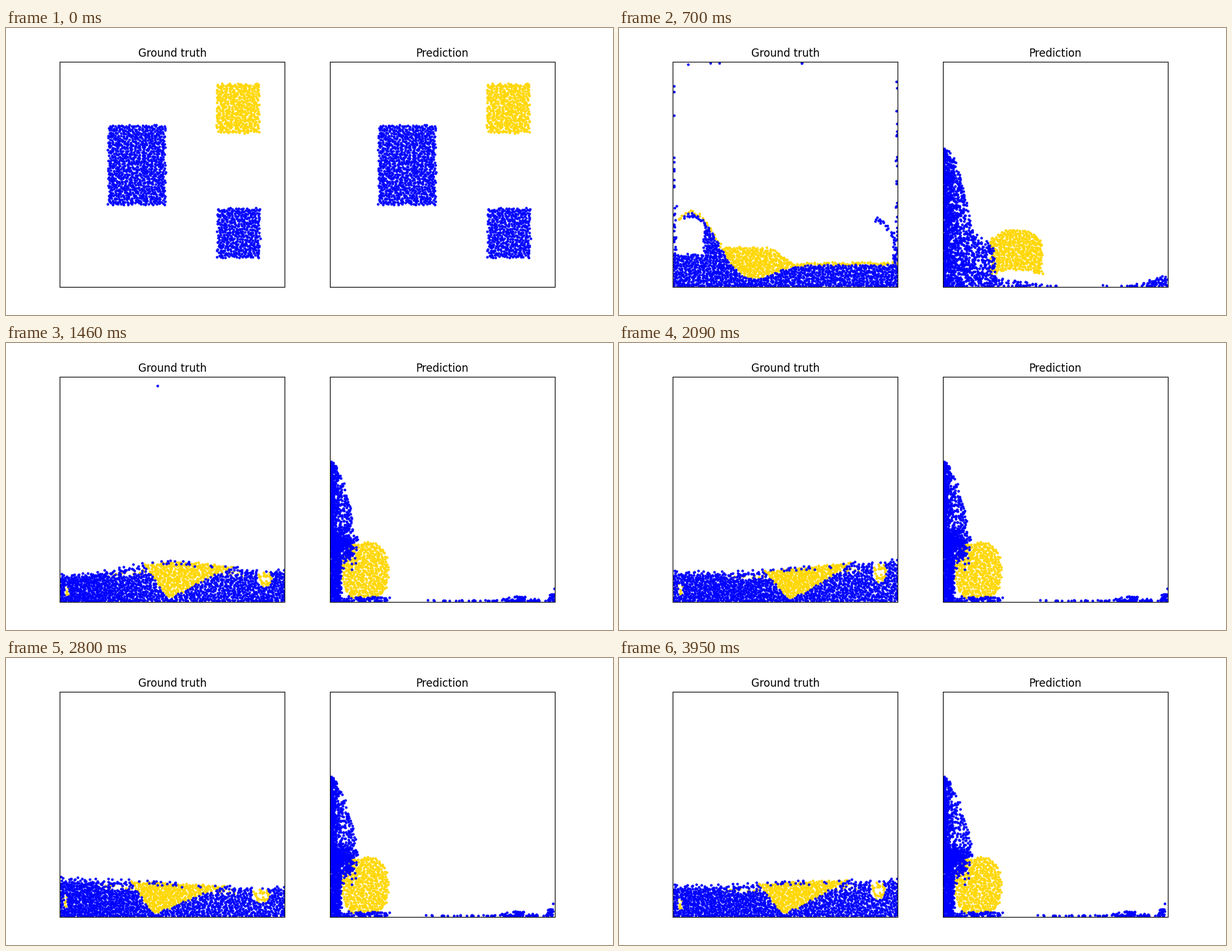
These frames come from a looping animation (950 by 450 pixels, 3.99 s). A matplotlib script:

```python
import numpy as np
import matplotlib.pyplot as plt
from matplotlib.animation import FuncAnimation

W, H, DPI = 950, 450, 100
FRAMES, INTERVAL = 114, 35
TANK_W, TANK_H, FLOOR = 352, 353, 406.1
N_WATER, N_SAND = 1400, 430
GRAVITY = 1693.0
KEYS = np.array([0.2, 0.42, 0.7, 1.1])

# Evenly spread candidate points; x runs from the left wall, h from the floor
rng = np.random.default_rng(7)
M = 80000
SPREAD = np.arange(1, M + 1)[:, None] * (0.7548776662, 0.5698402910) % 1
SPREAD = SPREAD * (TANK_W, TANK_H)
CHANCE = rng.random(M)


def ranked(pts, size=40):
    """Order by columns, then by height, so that poses pair up smoothly."""
    pts = pts[np.argsort(pts[:, 0])]
    cols = np.split(pts, range(size, len(pts), size))
    return np.concatenate([c[np.argsort(c[:, 1])] for c in cols])


def pose(n, density):
    """n points that follow a density between 0 and 1."""
    pts = SPREAD[CHANCE < density(*SPREAD.T)][:n]
    return ranked(pts + rng.uniform(-1, 1, pts.shape))


def layers(*parts):
    """Joins (weight, mask) pairs; the heaviest one counts."""
    return np.max([weight * mask for weight, mask in parts], axis=0)


def bell(x, centre, width):
    return np.exp(-((x - centre) / width) ** 2)


def block(x, h, x0, x1, h0, h1):
    return (x > x0) & (x < x1) & (h > h0) & (h < h1)


# Starting blocks
def water_blocks(x, h):
    return block(x, h, 75, 165, 129, 254) | block(x, h, 246.5, 313, 46, 124)


def sand_block(x, h):
    return block(x, h, 245, 312, 242, 319)


# Ground truth: jets up the walls, a breaking wave, then a calm pool
def jets(x, h):
    return h < 20 + 270 * np.exp(-x / 45) + 120 * np.exp((x - TANK_W) / 12)


def wave_top(x):
    return 35 - 25 * bell(x, 118, 50) + 82 * bell(x, 30, 52)


def wave_water(x, h):
    top = wave_top(x)
    cavity = (x < 48) & (h > 51) & (h < top - 6 * (x > 17))
    curl = (x > 313) & (abs(h - 107 + 0.027 * (x - 313) ** 2) < 3.5)
    return layers((1, (h < top) & ~cavity & ((x > 17) | (h < 51))),
                  (0.5, (x < 5) & (h < 136)),
                  (0.7, curl | (x > 344) & (h < 85)),
                  (0.25, ((x < 2) | (x > 349)) & (h < 330)),
                  (0.09, h > 350))


def wave_sand(x, h):
    top = wave_top(x)
    heap = 63 * np.exp(-((x - 110) / 90) ** 4)
    return (x > 8) & (h > top) & (h < np.maximum(top + 4, heap))


def sand_zones(x, h):
    bed = 3 + np.maximum(1.25 * (178 - x), 0.5 * (x - 178))
    streak = (abs(h - 43) < 4) & (abs(x - 185) < 108)
    pocket = ((x - 322) / 11) ** 2 + ((h - 38) / 13) ** 2 < 1
    corner = ((x - 11) / 4) ** 2 + ((h - 22) / 12) ** 2 < 1
    return (h > bed) & (h < 53), streak, pocket | corner


def pool_sand(x, h):
    wedge, streak, spots = sand_zones(x, h)
    return layers((1, wedge), (0.35, streak), (0.6, spots))


def pool_water(x, h):
    wedge, streak, spots = sand_zones(x, h)
    return layers((1, (h < 49) & ~(wedge | streak | spots)),
                  (0.4, streak & ~wedge),
                  (0.3, (h > 49) & (h < 55)))


# Prediction: a slump to the left, then a pile stuck on the wall
def slump(x, h):
    return layers((1, h < 240 * (1 - x / 105)),
                  (0.6, (x > 105) & (h < 10 + 28 * bell(x, 235, 80))))


def pile_water(x, h):
    edge = 4 * np.sqrt(np.maximum(218 - h, 0)) + 27 / (1 + np.exp((h - 78) / 4))
    return layers((0.3 + 0.7 * np.exp(-x / 12), x < edge),
                  (0.3, h < (185 - x) / 7),
                  (0.45, h < (x - 285) / 3.4),
                  (0.03, h < 4))


def slide_sand(x, h):
    arch = 1 - ((x - 114) / 41) ** 2
    return (arch > 0) & (h > 18 + 10 * arch) & (h < 75 + 16 * arch)


def stuck_water(x, h):
    edge = 3.6 * np.sqrt(np.maximum(220 - h, 0))
    hump = bell(x, 295, 25)
    return layers((0.2 + 0.8 * bell(x, 0, 7), (x < edge) & (h > 100)),
                  (bell(x, 10, 22) * bell(h, 92, 20), x < 43),
                  (0.6, (x < 17) & (h < 90)),
                  (0.25, (x < 92) & (h < 8)),
                  (0.12 + 0.2 * hump, (x > 150) & (h < 3 + 7 * hump)),
                  (0.5, h < 1.4 * (x - 336)))


def stuck_sand(x, h):
    return (abs((x - 55) / 37) ** 2.5 + abs((h - 48) / 46) ** 2.5 < 1) & (h > 6)


def fall(start, speed, t):
    return start + speed * t - (0, GRAVITY * t * t / 2)


class Flow:
    """Free fall up to the first key, then a smooth path through the poses."""

    def __init__(self, start, speed, *poses):
        self.start, self.speed = start, speed
        self.poses = np.array([fall(start, speed, KEYS[0]), *poses])
        self.slopes = np.gradient(self.poses, KEYS, axis=0)
        self.slopes[0] = speed - np.array([0, GRAVITY * KEYS[0]])
        self.slopes[-1] = 0

    def at(self, t):
        if t < KEYS[0]:
            return fall(self.start, self.speed, t)
        if t >= KEYS[-1]:
            return self.poses[-1]
        k = np.searchsorted(KEYS, t, "right") - 1
        d = KEYS[k + 1] - KEYS[k]
        u = (t - KEYS[k]) / d
        return ((2 * u**3 - 3 * u**2 + 1) * self.poses[k]
                + (u**3 - 2 * u**2 + u) * d * self.slopes[k]
                + (3 * u**2 - 2 * u**3) * self.poses[k + 1]
                + (u**3 - u**2) * d * self.slopes[k + 1])


def slosh(rest, t):
    """Standing waves of the settled pool."""
    x, h = rest.T
    s = np.pi * np.clip(x / TANK_W, 0, 1)
    swing = np.cos(2 * np.pi * (t - 1.9) / 2.44)
    hump = 8 * np.exp((1.46 - t) / 0.5) * np.cos(2 * np.pi * (t - 1.46) / 1.33)
    level = 54.3 - 10 * swing * np.cos(s) - hump * np.cos(2 * s)
    return np.column_stack([x + (21 * swing - 15.6) * np.sin(s), h * level / 53])


def creep(pts, t):
    """Slow drift of the loose drops beside the stuck pile."""
    x, h = pts.T
    k = np.clip((t - 1.46) / 2.5, 0, 1)
    f = np.clip(x / 40, 0, 1) * (h > 106)
    return np.column_stack([x + 14 * k * f**2 - 5 * k * (x > 140),
                            h - 22 * k * f**2])


def lone_drop(t):
    """Hangs from the ceiling, then falls into the pool."""
    return 152.5, max(351 - GRAVITY / 2 * max(t - 1.314, 0) ** 2, 50)


water0, sand0 = pose(N_WATER, water_blocks), pose(N_SAND, sand_block)
water_v = np.where(water0[:, :1] < 200, (-300.0, 0.0), (0.0, 0.0))
sand_v = np.array([-235.0, 0.0])
sand_air = fall(sand0, sand_v, KEYS[1])
calm_water, calm_sand = pose(N_WATER, pool_water), pose(N_SAND, pool_sand)

true_water = Flow(water0, water_v, pose(N_WATER, jets),
                  pose(N_WATER, wave_water), slosh(calm_water, KEYS[-1]))
true_sand = Flow(sand0, sand_v, sand_air,
                 pose(N_SAND, wave_sand), slosh(calm_sand, KEYS[-1]))
pred_water = Flow(water0, water_v, pose(N_WATER, slump),
                  pose(N_WATER, pile_water), pose(N_WATER, stuck_water))
pred_sand = Flow(sand0, sand_v, sand_air,
                 pose(N_SAND, slide_sand), pose(N_SAND, stuck_sand))

fig = plt.figure(figsize=(W / DPI, H / DPI), dpi=DPI, facecolor="white")


def panel(left, title):
    ax = fig.add_axes([left / W, 1 - FLOOR / H, TANK_W / W, TANK_H / H])
    ax.set(xlim=(0, TANK_W), ylim=(0, TANK_H), xticks=[], yticks=[])
    ax.set_title(title)
    return [ax.plot([], [], "o", ms=2, color=c)[0] for c in ("gold", "blue")]


dots = panel(84.1, "Ground truth") + panel(507.1, "Prediction")


def update(i):
    t = i * INTERVAL / 1000
    if t < KEYS[-1]:
        sand, water = true_sand.at(t), true_water.at(t)
    else:
        sand, water = slosh(calm_sand, t), slosh(calm_water, t)
        water = np.vstack([water, lone_drop(t)])
    groups = sand, water, pred_sand.at(t), creep(pred_water.at(t), t)
    for line, pts in zip(dots, groups):
        line.set_data(*np.clip(pts, (1.4, 1.8), (TANK_W - 1.2, TANK_H - 1.6)).T)
    return dots


anim = FuncAnimation(fig, update, frames=FRAMES, interval=INTERVAL,
                     repeat=True, repeat_delay=0)
plt.show()
```
